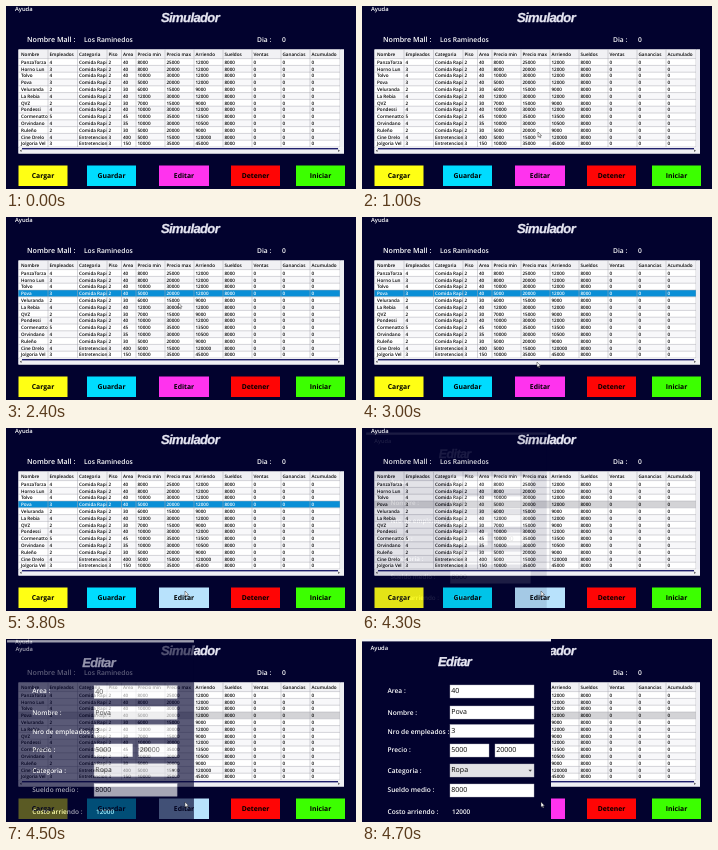
These frames come from a looping animation (350 by 183 pixels, 5.6 s). An HTML page:

```html
<!DOCTYPE html>
<html lang="es">
<head>
<meta charset="utf-8">
<title>Simulador</title>
<style>
html, body { margin: 0; width: 100%; height: 100%; overflow: hidden; background: #02022e; }
svg { display: block; width: 100%; height: 100%; }
text { font-family: "Open Sans", "Noto Sans", sans-serif; font-weight: 600; text-rendering: geometricPrecision; white-space: pre; }
.title { font: italic 700 13px "Liberation Sans", Arial, sans-serif; letter-spacing: -.6px; stroke: #e6e6f2; stroke-width: .3; }
</style>
</head>
<body>
<svg id="stage" viewBox="0 0 350 183" preserveAspectRatio="none"></svg>
<script>
const LOOP = 5600, STEP = 100;
const NAVY = '#02022e';
const PINK = [255, 51, 238], PALE = [184, 226, 252];
const ROW_TOP = 52.6, ROW_H = 6.8, PICKED = 3;

const rect = (x, y, w, h, fill, extra = '') =>
  `<rect x="${x}" y="${y}" width="${w}" height="${h}" fill="${fill}" ${extra}/>`;
const text = (x, y, size, str, extra = '') =>
  `<text x="${x}" y="${y}" font-size="${size}" ${extra}>${str}</text>`;

const heads = ['Nombre', 'Empleados', 'Categoria', 'Piso', 'Area', 'Precio min', 'Precio max',
  'Arriendo', 'Sueldos', 'Ventas', 'Ganancias', 'Acumulado'];
const colX = [15, 43.5, 73, 102.5, 117, 131.5, 160.5, 189.5, 218.5, 247.5, 276.5, 305.5];
const food = 'Comida Rapi,2', fun = 'Entretencion,3';
const shops = [
  `PanzaTorza,4,${food},40,8000,25000,12000`,
  `Horno Lun,3,${food},40,8000,20000,12000`,
  `Tolvo,4,${food},40,10000,30000,12000`,
  `Pova,3,${food},40,5000,20000,12000`,
  `Veluranda,2,${food},30,6000,15000,9000`,
  `La Rebia,4,${food},40,12000,30000,12000`,
  `QVZ,2,${food},30,7000,15000,9000`,
  `Pondessi,4,${food},40,10000,30000,12000`,
  `Cormenatto,5,${food},45,10000,35000,13500`,
  `Orvindano,4,${food},35,10000,30000,10500`,
  `Ruleño,2,${food},30,5000,20000,9000`,
  `Cine Drelo,4,${fun},400,5000,15000,120000`,
  `Jolgoria Vel,3,${fun},150,10000,35000,45000`
].map(s => [...s.split(','), 8000, 0, 0, 0]);

const cells = (list, y) => list.map((s, i) => text(colX[i], y, 4.6, s)).join('');

function table() {
  let s = rect(12.5, 43.5, 325.5, 104, '#fff') + rect(12.5, 43.5, 321.5, 9, '#f1f1f4');
  s += cells(heads, 50);
  shops.forEach((shop, i) => {
    const y = ROW_TOP + i * ROW_H;
    s += rect(12.5, y, 321.5, ROW_H, i % 2 ? '#f8f8fa' : '#fff', `id="bg${i}"`);
    s += `<g id="row${i}">${cells(shop, y + 5.1)}</g>`;
  });
  let d = '';
  for (let i = 0; i <= shops.length; i++) d += `M12.5 ${ROW_TOP + i * ROW_H}H334`;
  [...colX.slice(1), 335.5].forEach(x => d += `M${x - 1.5} 43.5V141`);
  s += `<path d="${d}" stroke="#a9a9b2" stroke-width=".5"/>`;
  s += rect(12.5, 141.4, 325.5, 6.1, '#f0f0f4') + rect(16, 142, 316, 1.4, '#20206c');
  s += rect(334.4, 43.5, 3.6, 98, '#eeeef3');
  s += `<path d="M15.5 143.4v2.6l-1.7-1.3zM332.2 143.4v2.6l1.7-1.3z" fill="#444"/>`;
  return s;
}

const button = (x, w, fill, label) =>
  rect(x, 159.5, w, 20.5, fill, `id="${label}"`) +
  text(x + w / 2, 172.3, 6.8, label, 'text-anchor="middle" font-weight="700" style="font-weight:700"');

function mainWindow() {
  return text(9, 5, 5.8, 'Ayuda', 'fill="#fff"') +
    `<text class="title" x="155" y="16.4" fill="#e6e6f2">Simulador</text>` +
    `<g fill="#fff">${text(21, 35.7, 7.1, 'Nombre Mall :')}${text(78, 35.7, 6.7, 'Los Raminedos')}` +
    `${text(251, 35.7, 6.7, 'Dia :')}${text(276, 35.7, 6.7, '0')}</g>` +
    table() +
    button(12.5, 49, '#ffff14', 'Cargar') + button(81, 49, '#00dcff', 'Guardar') +
    button(153, 50, '#ff33ee', 'Editar') + button(225, 49, '#ff0505', 'Detener') +
    button(290, 49, '#3cff00', 'Iniciar');
}

const field = (x, y, w, str, fill = '#fff') =>
  rect(x, y, w, 13, fill, 'stroke="#b8b8c4" stroke-width=".4"') +
  text(x + 1.3, y + 8.3, 7, str, 'style="font-weight:400"');

function dialog() {
  const labels = [['Area :', 53.5], ['Nombre :', 75.5], ['Nro de empleados :', 95.2], ['Precio :', 113.4],
    ['Categoria :', 134.2], ['Sueldo medio :', 153.3], ['Costo arriendo :', 175.4]];
  return rect(0, 0, 189, 200, NAVY) + rect(0, 0, 189, 2.4, '#f4f4f6') +
    text(8.5, 11.3, 5.8, 'Ayuda', 'fill="#fff"') +
    `<text class="title" x="76" y="27" fill="#e6e6f2">Editar</text>` +
    `<g fill="#fff">${labels.map(([s, y]) => text(25.5, y, 6.6, s)).join('')}` +
    `${text(90, 175.4, 6.4, '12000')}</g>` +
    field(88, 46, 84, '40') + field(88, 67, 84, 'Pova') + field(88, 85.5, 84, '3') +
    field(88, 105, 39, '5000') + field(133, 105, 39, '20000') +
    field(88, 125, 84, 'Ropa', '#e2e2e6') + field(88, 145, 84, '8000') +
    `<path d="M166.5 130.8h3.4l-1.7 2z" fill="#444"/>`;
}

const stage = document.getElementById('stage');
stage.innerHTML = rect(0, 0, 350, 183, NAVY) + mainWindow() +
  `<g id="dialog">${dialog()}</g>` +
  `<path id="cursor" d="M0 0V5.2L1.2 4.1 2 5.9 2.8 5.5 2 3.8H3.6Z" fill="#fff" stroke="#222" stroke-width=".45"/>`;
const get = id => document.getElementById(id);
const pickBg = get('bg' + PICKED), pickRow = get('row' + PICKED);
const editBtn = get('Editar'), popup = get('dialog'), cursor = get('cursor');

// time, x, y
const path = [[300, 180, 186], [900, 177, 135], [1000, 176, 126], [1500, 162, 85], [1800, 172, 75],
  [2300, 172, 75], [2900, 175, 141], [3000, 175, 145], [3500, 179, 163], [LOOP, 179, 163]];

const clamp = v => Math.max(0, Math.min(1, v));
const mix = (a, b, k) => a + (b - a) * k;

function cursorAt(t) {
  if (t <= path[0][0]) return path[0].slice(1);
  const i = path.findIndex(p => p[0] >= t);
  const [t0, x0, y0] = path[i - 1], [t1, x1, y1] = path[i];
  const k = (t - t0) / (t1 - t0);
  return [mix(x0, x1, k), mix(y0, y1, k)];
}

function draw(t) {
  cursor.setAttribute('transform', `translate(${cursorAt(t)})`);

  const active = t >= 2000 && t < 4300;
  pickBg.setAttribute('fill', active ? '#0a8fd6' : t >= 4300 ? '#d3d3d6' : '#f8f8fa');
  pickRow.setAttribute('fill', active ? '#fff' : '#000');

  const glow = t < 4600 ? clamp((t - 3500) / 300) : 0;
  editBtn.setAttribute('fill', `rgb(${PINK.map((c, i) => Math.round(mix(c, PALE[i], glow)))})`);

  const k = clamp((t - 4200) / 500);
  const size = 1 - .07 * (1 - k) ** 2;
  popup.setAttribute('opacity', k * k * (3 - 2 * k));
  popup.setAttribute('transform', `translate(94 100) scale(${size}) translate(-94 -100)`);
}

const start = performance.now();
function tick() {
  const t = (performance.now() - start) % LOOP;
  draw(Math.floor(t / STEP) * STEP);
  requestAnimationFrame(tick);
}
draw(0);
requestAnimationFrame(tick);
</script>
</body>
</html>
```
